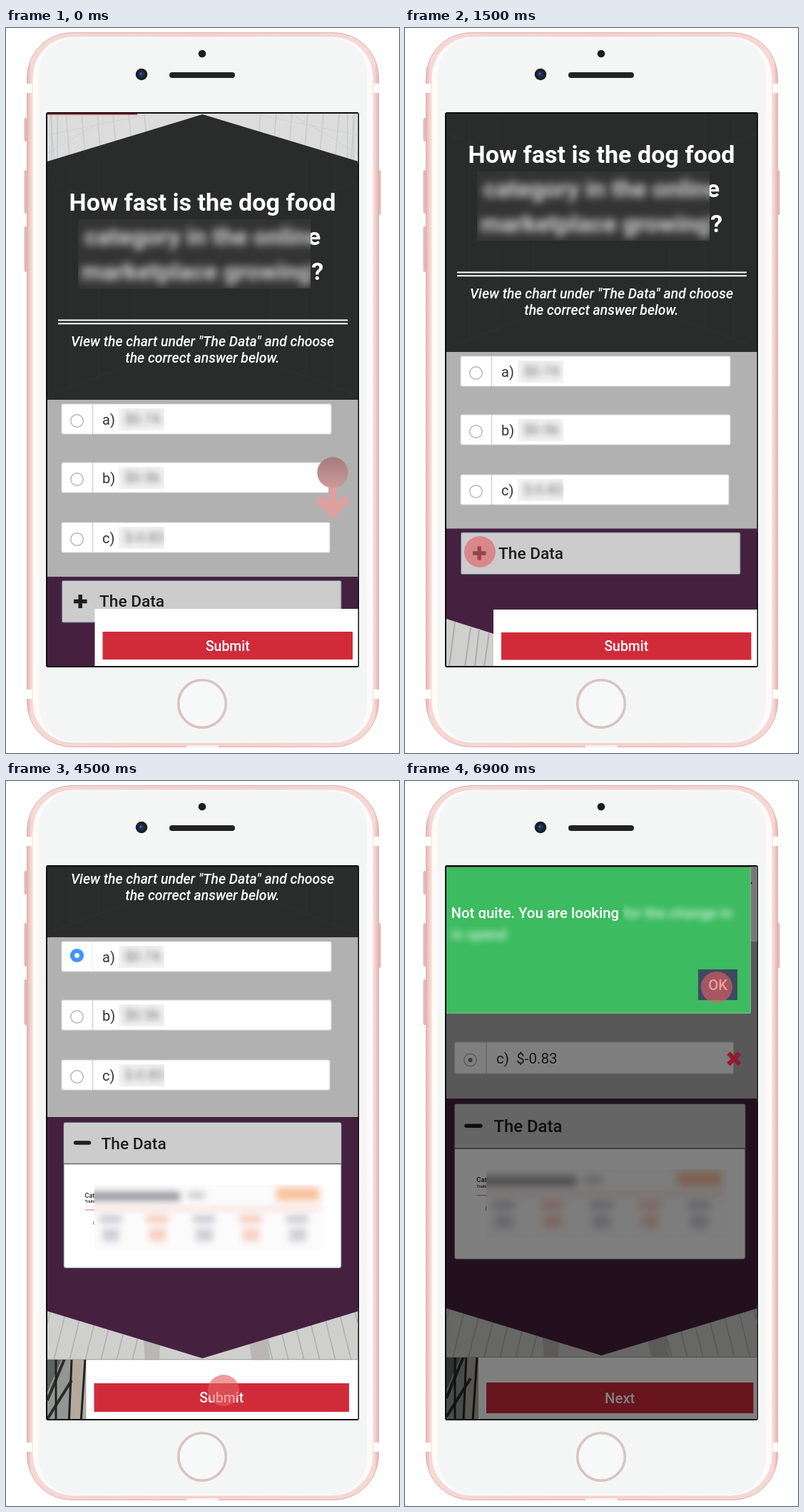
An HTML page that plays this animation: 551 by 1016 pixels, repeating every 7.5 s.

```html
<!DOCTYPE html>
<html lang="en">
<head>
<meta charset="utf-8">
<title>Phone quiz</title>
<style>
html, body { margin: 0; width: 100%; height: 100%; overflow: hidden; background: #fff; }
body > svg { display: block; width: 551px; height: 1016px; font-family: Roboto, sans-serif; }
text { white-space: pre; }
.title { font-size: 34.1px; font-weight: 700; fill: #fff; text-anchor: middle; }
.hint { font-size: 19.4px; font-weight: 500; font-style: italic; fill: #fff; text-anchor: middle; }
.option { font-size: 20px; fill: #333; }
.head { font-weight: 500; fill: #1d1d1d; }
.button { font-weight: 500; fill: #fff; text-anchor: middle; }
.note { font-size: 20.4px; font-weight: 500; fill: #fff; }
</style>
</head>
<body>
<svg viewBox="0 0 551 1016">
  <defs>
    <linearGradient id="rose">
      <stop offset="0" stop-color="#e4b5b0"/><stop offset=".012" stop-color="#f6d8d4"/>
      <stop offset=".5" stop-color="#f3d0cc"/><stop offset=".988" stop-color="#f6d8d4"/>
      <stop offset="1" stop-color="#e4b5b0"/>
    </linearGradient>
    <linearGradient id="swipe" x1="0" y1="0" x2="0" y2="1">
      <stop offset="0" stop-color="#a67c7d"/><stop offset="1" stop-color="#cc9a9b"/>
    </linearGradient>
    <filter id="blur6" x="-.3" y="-1" width="1.6" height="3"><feGaussianBlur stdDeviation="6"/></filter>
    <filter id="blur5" x="-.5" y="-1" width="2" height="3"><feGaussianBlur stdDeviation="5"/></filter>
  </defs>

  <!-- phone -->
  <path d="M27.5 128v29M27.5 201v57M27.5 280v60M523.5 201v59" stroke="#e3b9b4" stroke-width="4" stroke-linecap="round"/>
  <rect x="29.5" y="6.5" width="493" height="1001" rx="63" fill="url(#rose)" stroke="#ddb0ab"/>
  <path d="M29 84.5h9M514 84.5h9M29 933.5h9M514 933.5h9" stroke="#fff" stroke-width="13"/>
  <path d="M253 1006.5h45" stroke="#fbf1ef" stroke-width="3"/>
  <rect x="37" y="12" width="478" height="990" rx="57" fill="#fdfaf9" stroke="#f0d9d6"/>
  <rect x="46" y="14" width="460" height="986" rx="50" fill="#f4f6f6"/>
  <circle cx="275" cy="36" r="5.3" fill="#1c1c1e"/>
  <circle cx="190" cy="65" r="8.3" fill="#1d1e22"/>
  <circle cx="190" cy="65" r="4.5" fill="#17305c"/>
  <circle cx="189" cy="64" r="1.6" fill="#3f6bb0"/>
  <rect x="229" y="62" width="92" height="8" rx="4" fill="#232325"/>
  <circle cx="275" cy="947" r="33.3" fill="#f7f8f8" stroke="#d8c4c1" stroke-width="3.6"/>
  <rect x="56" y="118" width="439" height="778" rx="3" fill="#0c0c0c"/>

  <svg id="screen" x="58" y="120" width="435.5" height="774" viewBox="58 120 435.5 774"></svg>
</svg>

<script>
const RED = '#d12b3a', PURPLE = '#45213f';
const STEP = 1500;

const rect = (x, y, w, h, fill, more = '') =>
  `<rect x="${x}" y="${y}" width="${w}" height="${h}" fill="${fill}" ${more}/>`;
const circle = (x, y, r, fill, more = '') =>
  `<circle cx="${x}" cy="${y}" r="${r}" fill="${fill}" ${more}/>`;
const path = (d, fill, more = '') => `<path d="${d}" fill="${fill}" ${more}/>`;
const line = (d, color, width = 1, more = '') =>
  path(d, 'none', `stroke="${color}" stroke-width="${width}" ${more}`);
const text = (x, y, cls, str, more = '') =>
  `<text x="${x}" y="${y}" class="${cls}" ${more}>${str}</text>`;
const shift = (y, inner) => `<g transform="translate(0 ${y})">${inner}</g>`;
const clip = (x, y, w, h, inner) =>
  `<svg x="${x}" y="${y}" width="${w}" height="${h}" viewBox="${x} ${y} ${w} ${h}">${inner}</svg>`;
const blur = (n, inner) => `<g filter="url(#blur${n})">${inner}</g>`;
const touch = (x, y) => circle(x, y, 22, '#e25f62', 'opacity=".62"');

// Leaning bars, mirrored about the middle of the screen
function bars(y, h, lean, color) {
  let d = '';
  for (let i = 0; i < 7; i++) {
    const x = 62 + i * 22, e = x - lean;
    d += `M${x} ${y}L${e} ${y + h}M${551 - x} ${y}L${551 - e} ${y + h}`;
  }
  return line(d, color, 1.6);
}

function roofPhoto() {
  return rect(58, 120, 436, 70, '#dcdcdc') + bars(120, 70, -6, '#c9ccce') +
    line('M58 150L200 121M58 176L150 121M493 150L351 121M493 176L401 121', '#cfd1d3') +
    line('M64 120V190M72 120V190M479 120V190M487 120V190', '#bfc4c9');
}

function header(dy) {
  const blurred = text(275.5, 304, 'title', 'category in the online') +
    text(275.5, 353, 'title', 'marketplace growing?');
  return shift(dy,
    path('M58 187L275.5 121L494 187V521H58Z', '#2a2b2b') +
    line('M58 215L180 260V470L58 515M493 215L371 260V470L493 515M90 190V505M461 190V505M130 180V490M421 180V490', '#303131') +
    text(275.5, 256, 'title', 'How fast is the dog food') + blurred +
    clip(101, 268, 326, 97, rect(101, 268, 326, 97, '#343434') +
      `<g opacity=".8">${blur(6, blurred)}</g>`) +
    line('M73 409.5H479M73 414.3H479', '#fff', 2) +
    text(275.5, 446, 'hint', 'View the chart under "The Data" and choose') +
    text(275.5, 469, 'hint', 'the correct answer below.'));
}

function radio(x, y, on) {
  return on
    ? circle(x, y - 4, 9.6, '#3f94f8') + circle(x, y - 4, 3.4, '#fff')
    : circle(x, y, 8.7, '#fff', 'stroke="#b4b4b4" stroke-width="1.4"');
}

function option(label, value, y, w, on) {
  return rect(78, y, w, 42, '#fff', 'rx="2" stroke="#d5d5d5"') +
    line(`M121.5 ${y}v42`, on ? '#f0f0f0' : '#ccc', 1.3) +
    radio(99.5, y + 23.5, on) + text(135, y + 28.5, 'option', label + ')') +
    clip(158, y + 6, 64, 31, rect(158, y + 6, 64, 31, '#f3f3f3') +
      `<g opacity=".75">${blur(5, text(166, y + 28, 'option', value))}</g>`);
}

const options = (dy, on) => shift(dy,
  rect(58, 521, 436, 252, '#b1b1b1') +
  option('a', '$0.74', 527, 378, on) +
  option('b', '$0.56', 609, 378) +
  option('c', '$-0.83', 693, 376));

function closedData(dy) {
  return shift(dy, rect(58, 769, 436, 190, PURPLE) +
    rect(78.5, 774.5, 391.5, 58.5, '#ccc', 'rx="2" stroke="#66748a"') +
    line('M95 803.5H113.5M104.2 794V813', '#1d1d1d', 5.4) +
    text(131, 811, 'head', 'The Data', 'font-size="22.7"'));
}

// Chart in coordinates relative to the panel corner
function chart() {
  let cells = '';
  for (let i = 0; i < 5; i++) {
    const color = i % 2 ? '#f6c4b4' : '#c3c3cf';
    cells += rect(50 + i * 65.5, 131, 31, 9, color) + rect(54 + i * 65.5, 148, 24, 19, color, 'opacity=".75"');
  }
  return text(29.5, 105, 'head', 'Category', 'font-size="9"') +
    text(29.5, 112.5, 'head', 'Trailing', 'font-size="5.6"') +
    line('M30 122.5H60', '#e58a80', 1.3) + text(41, 142, 'head', '(', 'font-size="6"') +
    clip(42.5, 87, 323, 92, rect(42.5, 87, 323, 92, '#fcfbfb') +
      blur(5, rect(36, 97, 127, 13, '#9a9aa0') + rect(174, 97, 24, 10, '#ccccd0') +
        rect(298, 91, 60, 19, '#f9c3a0') + line('M36 121H360', '#f4c5b8', 3) + cells));
}

function openData(x, y, w, h, headH, scale, size) {
  const mid = y + headH / 2;
  return rect(x, y, w, h, '#fff', 'rx="3" stroke="#66748a"') +
    rect(x + .5, y + .5, w - 1, headH, '#ccc') +
    line(`M${x} ${y + headH}h${w}`, '#5a6879', 1.3) +
    line(`M${x + 16.5} ${mid - .5}h${19 * scale}`, '#1d1d1d', 5.4, 'stroke-linecap="round"') +
    text(x + 52 * (scale + .01), mid + 8, 'head', 'The Data', `font-size="${size}"`) +
    `<g transform="translate(${x} ${y}) scale(${scale})">${chart()}</g>`;
}

function chevron(top, side, tip) {
  return rect(58, side - 5, 436, tip - side + 8, '#cfcfce') + bars(side, tip - side + 3, 17, '#aeb0b0') +
    path(`M190 ${side}h28l-3 70h-20zM361 ${side}h-28l12 70h26z`, '#b9b6b4') +
    path(`M58 ${top}H494V${side}L275.5 ${tip}L58 ${side}Z`, PURPLE);
}

function windowPhoto(y, w) {
  return clip(58, y, w, 90, rect(58, y, w, 90, '#929794') +
    rect(58 + w * .6, y, w * .4, 90, '#b3aa9d') +
    path(`M58 ${y}h20l-20 46z`, '#5d6261') +
    line(`M82 ${y}L58 ${y + 58}M92 ${y + 30}L58 ${y + 84}`, '#2b2b2b', 4) +
    line(`M70 ${y}v90M${58 + w * .62} ${y}l-4 90M${56 + w} ${y}l-6 90`, '#222', 3));
}

function footer(x, y, bx, by, bw, bh, label, size) {
  return rect(x, y, 494 - x, 895 - y, '#fff') + rect(bx, by, bw, bh, RED) +
    text(bx + bw / 2, by + bh / 2 + 7, 'button', label, `font-size="${size}"`);
}

function start() {
  return roofPhoto() + header(0) + rect(58, 120, 126, 1.6, '#b3202f') + options(0) + closedData(0) +
    footer(124.5, 814, 135.5, 846, 350.5, 39, 'Submit', 19.4) +
    path('M452 640H463.5V664L474 655L483 663L458 688L433 663L442 655L452 664Z', '#dda0a1') +
    circle(458, 623, 21.7, 'url(#swipe)');
}

function scrolled() {
  return header(-67) + options(-67) + closedData(-67.5) +
    path('M58 828L124.5 849V895H58Z', '#cfcfce') +
    line('M70 832L62 895M92 840L84 895M104 842L98 895M118 847L111 895', '#aaadad', 2) +
    footer(124, 815, 135, 847, 350.5, 38.5, 'Submit', 19.4) + touch(105, 734);
}

function opened(picked) {
  return header(-302) + options(-302, picked) + chevron(471.5, 743, 809) +
    openData(81, 478.5, 389, 204, 58, 1, 22.7) + windowPhoto(810, 55) +
    line('M58 810.5H494', '#a5a5a5') +
    footer(112.5, 811.5, 123.5, 844, 357.5, 40, 'Submit', 19.5) +
    (picked ? touch(305, 854) : touch(99, 245));
}

function alertBox() {
  const dimmed = rect(58, 120, 436, 330, '#b1b1b1') + rect(484, 120, 10, 105, '#f2f2f2') +
    rect(69.5, 366, 391, 44, '#fff', 'rx="2" stroke="#d5d5d5"') + line('M114 366V410', '#ccc', 1.4) +
    radio(91.5, 391) + circle(91.5, 391, 3, '#777') +
    text(128, 396, 'option', 'c)  $-0.83', 'style="font-size:20.6px"') +
    chevron(445, 739, 805) + openData(69.5, 452.5, 407.5, 217.5, 62.5, 1.046, 23.9) +
    windowPhoto(807, 45) + line('M58 807.5H494', '#a5a5a5') +
    footer(103, 808, 114, 843, 374.5, 43, 'Next', 20.3);
  const blurred = text(305, 192, 'note', 'for the change in') + text(65, 222, 'note', 'in spend');
  return dimmed + rect(58, 120, 436, 775, '#000', 'opacity=".5"') +
    line('M453.5 381.5L469 397M469 381.5L453.5 397', '#96192b', 6.4) +
    circle(485, 143, 1.5, '#111') +
    rect(58, 121, 426, 204.5, '#3cbb60') + line('M58 325.3H484.3V121', '#8fbf9c') +
    text(64.5, 192, 'note', 'Not quite. You are looking f') +
    rect(101, 193, 50, 6, '#3cbb60') +
    clip(306, 165, 170, 40, rect(306, 165, 170, 40, '#3cbb60') + `<g opacity=".8">${blur(5, blurred)}</g>`) +
    clip(58, 202, 110, 40, `<g opacity=".8">${blur(5, blurred)}</g>`) +
    rect(411, 264, 55, 43, '#3f4a60') +
    text(438.7, 293, 'button', 'OK', 'font-size="20.4"') + touch(437, 289);
}

const screen = document.getElementById('screen');
screen.innerHTML = [start(), scrolled(), opened(false), opened(true), alertBox()]
  .map(s => `<g>${s}</g>`).join('');
const scenes = [...screen.children];

function draw() {
  const now = Math.floor(performance.now() / STEP) % scenes.length;
  scenes.forEach((g, i) => { g.style.display = i === now ? '' : 'none'; });
  requestAnimationFrame(draw);
}
draw();
</script>
</body>
</html>
```
